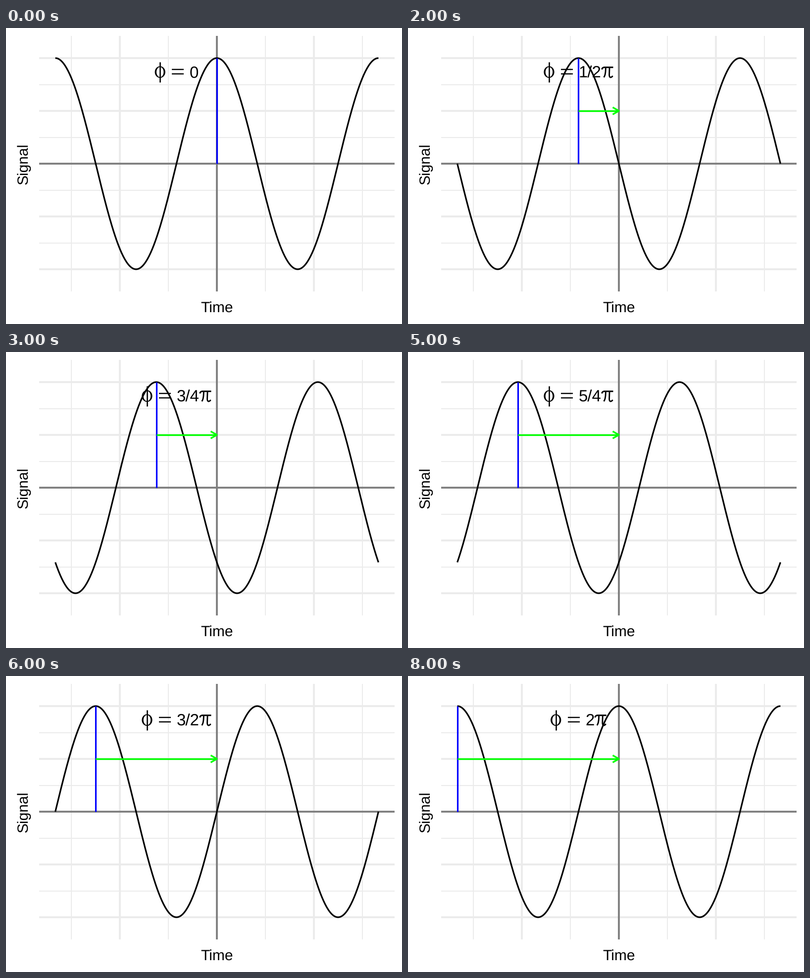
Animation of 800x600 px, one loop 9000 ms. Source, as a matplotlib script:

```python
import numpy as np
import matplotlib.pyplot as plt
from matplotlib.animation import ArtistAnimation
from matplotlib.patches import PathPatch
from matplotlib.path import Path

W, H, DPI = 800, 600, 100
PT = 72 / DPI                        # points per pixel
LEFT, RIGHT, TOP, BOTTOM = 67, 785, 16, 533.7
X0, Y0, AMP = 426, 275, 214          # plot centre and amplitude
UNIT = 326.4 / (2 * np.pi)           # pixels per radian

EM, DIGIT, GAP = 45.5, 33, 11.5      # symbol size, digit size, space around "="
LABEL_X, BASE = 344.4, 100.5         # label centre and baseline
LABELS = ["0", "1/4π", "1/2π", "3/4π", "π", "5/4π", "3/2π", "7/4π", "2π"]

plt.rcParams.update({"font.family": "Liberation Sans", "text.hinting": "none"})

fig = plt.figure(figsize=(W / DPI, H / DPI), dpi=DPI, facecolor="white")
ax = fig.add_axes([0, 0, 1, 1])
ax.set(xlim=(0, W), ylim=(H, 0))
ax.axis("off")


def line(x, y, color, width, z=2, cap="butt"):
    return ax.plot(x, y, color=color, lw=width * PT, zorder=z,
                   solid_capstyle=cap, solid_joinstyle="round")[0]


def vline(x, color, width, z):
    line([x, x], [TOP, BOTTOM], color, width, z)


def hline(y, color, width, z):
    line([LEFT, RIGHT], [y, y], color, width, z)


def draw_grid():
    for k in range(-3, 4):
        vline(X0 + 98 * k, "#EBEBEB", 1.94 if k % 2 else 3.87, 0 if k % 2 else 1)
    for k in range(-4, 5):
        hline(Y0 + 53.5 * k, "#EBEBEB", 1.94 if k % 2 else 3.87, 0 if k % 2 else 1)
    hline(Y0, "#7F7F7F", 3.8, 2)
    vline(X0, "#7F7F7F", 3.8, 2)
    style = dict(fontsize=30 * PT, ha="center", va="baseline")
    ax.text(X0, 577, "Time", **style)
    ax.text(43, 275, "Signal", rotation=90, rotation_mode="anchor", **style)


def draw_phi(x):
    a = np.linspace(0, 2 * np.pi, 80)
    cx, cy = x + 0.26 * EM, BASE - 11.2
    px = np.r_[10.6 * np.cos(a), 7.2 * np.cos(a[::-1])]
    py = np.r_[11.8 * np.sin(a), 10.1 * np.sin(a[::-1])]
    bowl, = ax.fill(cx + px, cy + py, color="black", lw=0, zorder=6)
    return [bowl, line([cx, cx], [BASE - 31.5, BASE + 9.8], "black", 2.6, 6)]


def draw_equals(x):
    return [line([x + 0.011 * EM, x + 0.537 * EM], [BASE - h] * 2, "black", 2.4, 6)
            for h in (7.6, 16.6)]


def draw_pi(x):
    M, L, C = Path.MOVETO, Path.LINETO, Path.CURVE4
    strokes = [
        (3.0, [(0.9, -16.5), (2, -20), (3.5, -20.8), (7, -20.8), (23.8, -20.8)],
         [M, C, C, C, L]),
        (2.8, [(8.7, -20.5), (8.6, -12), (8, -4), (4.8, -0.6)], [M, C, C, C]),
        (2.8, [(16.4, -20.5), (15.9, -6), (15.8, 1), (20, 1), (22.8, -3.5)],
         [M, L, C, C, C]),
    ]
    return [ax.add_patch(PathPatch(Path(np.array(pts) + (x, BASE), codes),
                                   fill=False, lw=w * PT, zorder=6))
            for w, pts, codes in strokes]


def draw_label(text):
    digits = text.rstrip("π")
    has_pi = digits != text
    width = DIGIT * sum(0.278 if c == "/" else 0.556 for c in digits)
    total = 1.07 * EM + 2 * GAP + width + 0.549 * EM * has_pi
    x = LABEL_X - total / 2
    parts = draw_phi(x)
    x += 0.521 * EM + GAP
    parts += draw_equals(x)
    x += 0.549 * EM + GAP
    parts.append(ax.text(x, BASE, digits, fontsize=DIGIT * PT,
                         va="baseline", zorder=6))
    if has_pi:
        parts += draw_pi(x + width)
    return parts


def draw_arrow(x):
    y = Y0 - AMP / 2
    dx, dy = 14.4 * np.cos(np.pi / 6), 14.4 * np.sin(np.pi / 6)
    return [line([x, X0], [y, y], "#00FF00", 3.4, 5),
            line([X0 - dx, X0, X0 - dx], [y - dy, y, y + dy], "#00FF00", 3.4, 5)]


def draw_step(k):
    phase = k * np.pi / 4
    peak = X0 - phase * UNIT
    parts = [line(X0 + t * UNIT, Y0 - AMP * np.cos(t + phase), "black", 3.2, 3),
             line([peak, peak], [Y0, Y0 - AMP], "#0000FF", 3.2, 4)]
    if k:
        parts += draw_arrow(peak)
    return parts + draw_label(LABELS[k])


t = np.linspace(-2 * np.pi, 2 * np.pi, 401)
draw_grid()
steps = [draw_step(k) for k in range(len(LABELS))]
anim = ArtistAnimation(fig, steps, interval=1000, repeat=True, repeat_delay=0)
plt.show()
```
